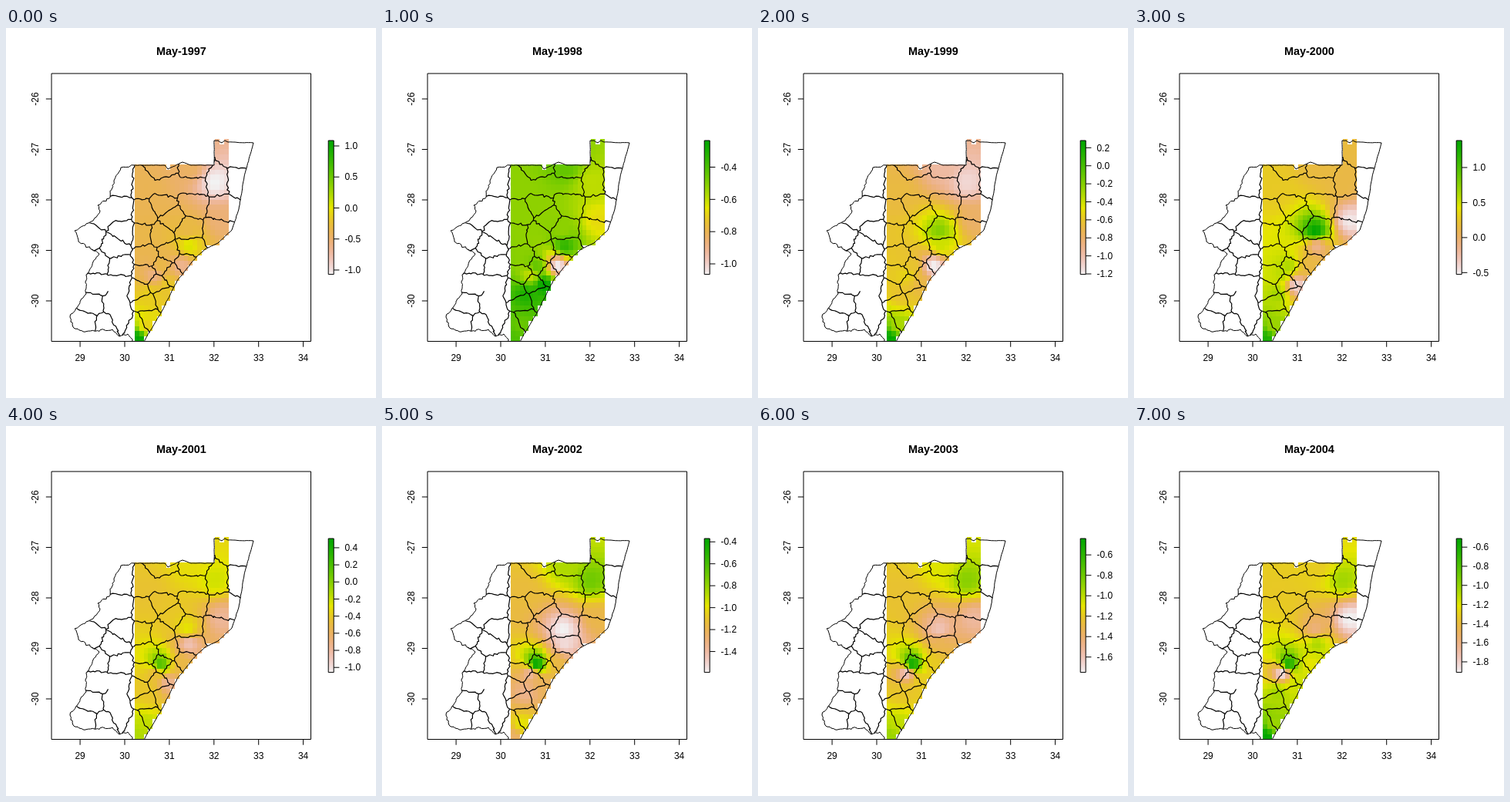
Write an HTML page with a canvas that moves like this. It is 480 by 480 pixels and loops after 8 s.

```html
<!DOCTYPE html>
<html lang="en">
<head>
<meta charset="utf-8">
<style>
  html, body { margin: 0; width: 100%; height: 100%; overflow: hidden; background: #fff; }
  canvas { display: block; width: 480px; height: 480px; }
</style>
</head>
<body>
<canvas id="map" width="480" height="480"></canvas>
<script>
const ctx = document.getElementById('map').getContext('2d');
const FONT = '"Liberation Sans", Arial, sans-serif';
const BOX = { x: 59.04, y: 59.04, w: 336.5, h: 347.5 };
const CELL = { x: 167, y: 144.3, w: 5.79, h: 6.55, cols: 21, rows: 40 };
const BAR = { x: 418.2, y: 146, w: 7, h: 173.6 };

const parse = text => text.trim().split(/\s+/).map(pair => pair.split(',').map(Number));

// Corner points of the province: north border and coast, then the inland side.
const coast = parse(`168,178 206,178 210,183 214,181 229,174 240,178 270,178 270,146 275,146
  280,149 284,146 288,148 321,149 309,193 302,235 293,262 275,279 258,287 247,297 222,328
  203,366 178,408`);
const inland = parse(`168,178 149,181 140,198 134,221 119,230 122,237 113,250 89,263 94,277
  121,293 104,320 104,345 83,375 87,388 103,394 138,391 147,400 158,397 166,408`);

// District centres; borders run halfway between neighbours.
const districts = parse(`150,202 148,236 124,242 108,270 152,264 141,284 120,306 146,310
  119,332 146,332 112,358 140,356 104,382 129,386 148,376 178,204 202,184 208,204 180,240
  203,230 245,184 245,204 243,228 275,200 300,164 300,198 280,234 275,264 215,248 235,262
  177,268 200,268 236,284 211,292 184,296 203,309 233,304 182,320 214,318 174,340 196,332
  204,349 182,356 185,378 171,386`);

// Points the surface is interpolated from; every survey has one level (0..1) per point.
const stations = parse(`271,200 238,182 185,215 280,250 235,264 237,283 228,308 200,309
  193,320 210,333 187,345 182,388 171,403`);
const survey = (lo, hi, ...levels) => ({ lo, hi, levels });
const mix = (a, b) => survey((a.lo + b.lo) / 2, (a.hi + b.hi) / 2,
  ...a.levels.map((level, i) => (level + b.levels[i]) / 2));

const y1997 = survey(-1.07, 1.087, 0, .29, .32, .25, .35, .52, .2, .35, .22, .42, .44, .44, 1);
const y1998 = survey(-1.065, -.235, .57, .75, .66, .47, .66, .87, 0, .75, .55, 1, .92, .74, .8);
const y1999 = survey(-1.205, .28, .06, .16, .36, .28, .68, .54, 0, .4, .46, .35, .4, .6, 1);
const y2000 = survey(-.525, 1.385, .35, .36, .42, .02, 1, .2, .35, .6, .58, .05, .62, .63, .92);
const y2002 = survey(-1.59, -.37, .72, .6, .37, .34, 0, .05, .35, 1, .15, .3, .2, .5, .28);
const y2004 = survey(-1.91, -.51, .62, .43, .42, 0, .24, .6, .5, .94, 0, .55, .62, .63, 1);
const years = [y1997, y1998, y1999, y2000, mix(y2000, y2002), y2002, mix(y2002, y2004), y2004];

let seed = 7;
const random = () => (seed = seed * 16807 % 2147483647) / 2147483647;

// Adds a polyline with small seeded wiggles between its points.
function addRough(path, points, wiggle) {
  path.moveTo(...points[0]);
  for (let i = 1; i < points.length; i++) {
    const [x0, y0] = points[i - 1], [x1, y1] = points[i];
    const parts = Math.max(1, Math.round(Math.hypot(x1 - x0, y1 - y0) / 3));
    for (let k = 1; k < parts; k++) {
      const t = k / parts;
      path.lineTo(x0 + (x1 - x0) * t + (random() - .5) * wiggle,
                  y0 + (y1 - y0) * t + (random() - .5) * wiggle);
    }
    path.lineTo(x1, y1);
  }
}

// The part of the bisector of a and b that no other centre is closer to.
function sharedBorder(a, b) {
  const mx = (a[0] + b[0]) / 2, my = (a[1] + b[1]) / 2;
  const dx = a[1] - b[1], dy = b[0] - a[0];
  let from = -9, to = 9;
  for (const c of districts) {
    if (c === a || c === b) continue;
    const ux = a[0] - c[0], uy = a[1] - c[1];
    const slope = dx * ux + dy * uy;
    const limit = ((a[0] + c[0]) / 2 - mx) * ux + ((a[1] + c[1]) / 2 - my) * uy;
    if (slope > 0) from = Math.max(from, limit / slope);
    else to = Math.min(to, limit / slope);
  }
  return from < to && [from, to].map(t => [mx + dx * t, my + dy * t]);
}

const province = new Path2D(), outline = new Path2D(), borders = new Path2D();
[...coast, ...inland.slice().reverse()].forEach(p => province.lineTo(...p));
province.closePath();
addRough(outline, coast, .6);
addRough(outline, inland, 2.6);
districts.forEach((a, i) => districts.slice(i + 1).forEach(b => {
  const border = sharedBorder(a, b);
  if (border) addRough(borders, border, 3);
}));

// Terrain palette: pale grey, tan, yellow, green.
function terrain(level) {
  const t = level > .5 ? level * 2 - 1 : level * 2;
  const [h, s, v] = level > .5 ? [60 + 60 * t, 1, .9 - .25 * t] : [60 * t, t, .95 - .05 * t];
  const channel = n => {
    const k = (n + h / 60) % 6;
    return Math.round(255 * v * (1 - s * Math.max(0, Math.min(k, 4 - k, 1))));
  };
  return `rgb(${channel(5)},${channel(3)},${channel(1)})`;
}

// Inverse distance weighting.
function levelAt(x, y, levels) {
  let sum = 0, total = 0;
  stations.forEach(([sx, sy], i) => {
    const weight = ((x - sx) ** 2 + (y - sy) ** 2 + 4) ** -1.3;
    sum += weight * levels[i];
    total += weight;
  });
  return sum / total;
}

function line(x0, y0, x1, y1) {
  ctx.beginPath();
  ctx.moveTo(x0, y0);
  ctx.lineTo(x1, y1);
  ctx.stroke();
}

function drawSurface(levels) {
  for (let row = 0; row < CELL.rows; row++) {
    for (let col = 0; col < CELL.cols; col++) {
      const x = CELL.x + col * CELL.w, y = CELL.y + row * CELL.h;
      const cx = x + CELL.w / 2, cy = y + CELL.h / 2;
      if (!ctx.isPointInPath(province, cx, cy)) continue;
      const left = Math.round(x), top = Math.round(y);
      ctx.fillStyle = terrain(levelAt(cx, cy, levels));
      ctx.fillRect(left, top, Math.round(x + CELL.w) - left, Math.round(y + CELL.h) - top);
    }
  }
}

function drawAxes() {
  const bottom = BOX.y + BOX.h;
  ctx.strokeRect(BOX.x, BOX.y, BOX.w, BOX.h);
  ctx.textAlign = 'center';
  for (let lon = 29; lon <= 34; lon++) {
    const x = 96.1 + (lon - 29) * 57.9;
    line(x, bottom, x, bottom + 7.2);
    ctx.fillText(lon, x, 432);
  }
  for (let lat = -26; lat >= -30; lat--) {
    const y = 92 + (-26 - lat) * 65.5;
    line(BOX.x - 7.2, y, BOX.x, y);
    ctx.save();
    ctx.translate(42, y);
    ctx.rotate(-Math.PI / 2);
    ctx.fillText(lat, 0, 0);
    ctx.restore();
  }
}

function drawLegend({ lo, hi }) {
  const step = hi - lo > 1.6 ? .5 : .2;
  const right = BAR.x + BAR.w;
  for (let i = 0; i < BAR.h; i++) {
    ctx.fillStyle = terrain(1 - i / BAR.h);
    ctx.fillRect(BAR.x, BAR.y + i, BAR.w, 1);
  }
  ctx.strokeRect(BAR.x, BAR.y, BAR.w, BAR.h);
  ctx.fillStyle = '#000';
  ctx.textAlign = 'left';
  for (let i = Math.ceil(lo / step); i * step <= hi; i++) {
    const y = BAR.y + (hi - i * step) / (hi - lo) * BAR.h;
    line(right, y, right + 7.2, y);
    ctx.fillText((i * step).toFixed(1), 439.4, y + 4.2);
  }
}

function draw(index) {
  const year = years[index];
  ctx.fillStyle = '#fff';
  ctx.fillRect(0, 0, 480, 480);
  ctx.strokeStyle = '#000';
  ctx.lineWidth = 1;
  ctx.lineJoin = 'round';

  ctx.save();
  ctx.beginPath();
  ctx.rect(BOX.x, BOX.y, BOX.w, BOX.h);
  ctx.clip();
  drawSurface(year.levels);
  ctx.stroke(outline);
  ctx.clip(province);
  ctx.lineWidth = 1.2;
  ctx.stroke(borders);
  ctx.restore();

  ctx.fillStyle = '#000';
  ctx.font = `12px ${FONT}`;
  drawAxes();
  drawLegend(year);
  ctx.textAlign = 'center';
  ctx.font = `bold 14.4px ${FONT}`;
  ctx.fillText(`May-${1997 + index}`, 227.3, 35);
}

const start = performance.now();
let shown = -1;
function tick() {
  const index = Math.floor((performance.now() - start) / 1000) % years.length;
  if (index !== shown) draw(shown = index);
  requestAnimationFrame(tick);
}
tick();
</script>
</body>
</html>
```
